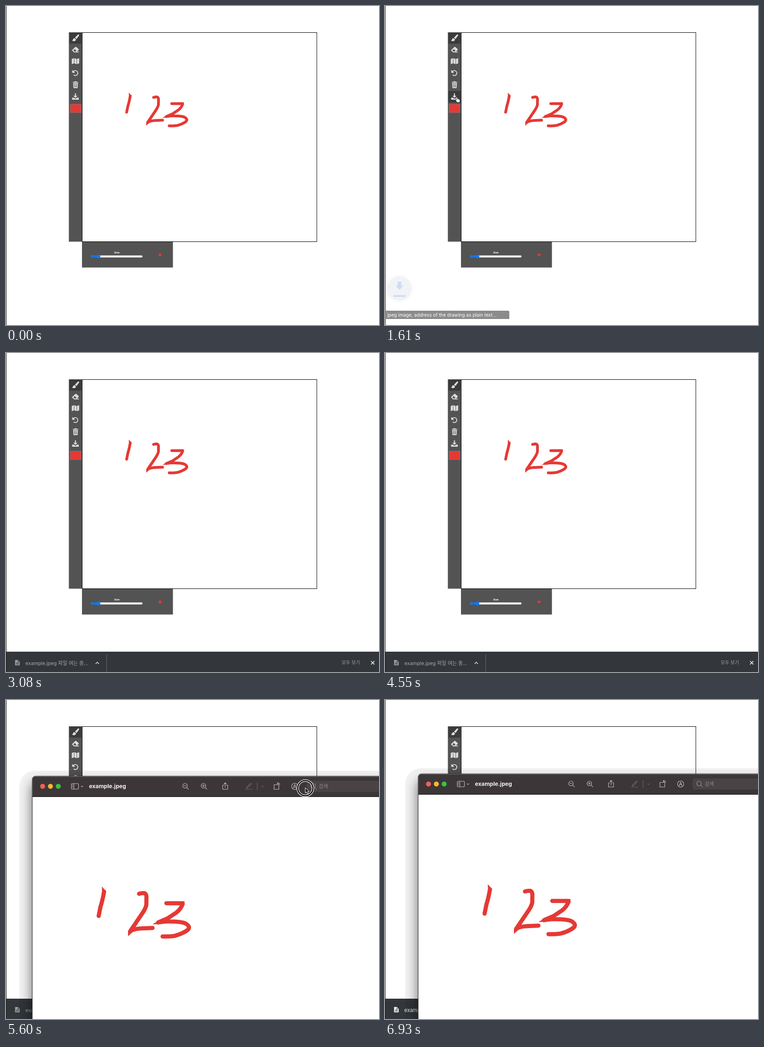
Recreate the animation shown at these times as an HTML page. Size 810 px wide and 691 px high, loop 7000 ms.

```html
<!DOCTYPE html>
<html lang="ko">
<head>
<meta charset="utf-8">
<title>Drawing board</title>
<style>
html, body { margin: 0; width: 100%; height: 100%; overflow: hidden; background: #fff; }
svg { display: block; width: 810px; height: 691px; }
text { font-family: Inter, "Noto Sans CJK KR", "Noto Sans CJK", sans-serif; white-space: pre; }
.line { fill: none; stroke: #ddd; stroke-width: 1.9; }
.tool { fill: none; stroke: #c4bfc0; stroke-width: 1.1; stroke-linecap: round; stroke-linejoin: round; }
.dim { stroke: #6b6465; }
</style>
</head>
<body>
<svg viewBox="0 0 810 691" width="810" height="691">
  <defs>
    <filter id="blur" x="-20%" y="-20%" width="140%" height="140%"><feGaussianBlur stdDeviation="12"/></filter>
    <g id="digits" fill="none" stroke="#e53935" stroke-width="6" stroke-linecap="round" stroke-linejoin="round">
      <path d="M269.8 195Q267.5 208 264.6 217L262 230"/>
      <path d="M266.6 187.5L273 194.5 270 199 267 197Z" fill="#e53935" stroke="none"/>
      <path d="M320.5 198Q324 196.8 328 197Q331 198 331.2 202L331 214Q330 219 326 225L308 251.5Q314 248.5 324 248L340 247.3"/>
      <path d="M304.5 251V259.3L315 250Z" fill="#e53935" stroke="none"/>
      <path d="M360 211.6H383.5V213Q381 220 374 225.5Q367 230 362 233.5L348 239.5Q354 237.8 364 238Q382 238 388 241Q396 246 390.5 250.5Q383 256 372 258.8Q364 260 354.5 259.6"/>
      <path d="M376 208.8H386.2V214L380 215ZM339.8 242.2L350 236 356 241.5Z" fill="#e53935" stroke="none"/>
    </g>
    <path id="doc" d="M0 0H6L10 4V11.5H0ZM5.4 1.2V4.7H8.9ZM2 7.2H8V6H2ZM2 9.6H8V8.4H2Z" fill-rule="evenodd"/>
    <g id="glass" class="tool"><circle cx="-1.2" cy="-1.2" r="5"/><path d="M2.6 2.6L6.4 6.4"/></g>
  </defs>

  <rect width="810" height="691" fill="#fff"/>
  <rect width="1" height="691" fill="#1c1416"/>

  <rect x="165.5" y="57.5" width="509.5" height="453" fill="#fff" stroke="#000"/>
  <rect x="136.5" y="57" width="28.5" height="453.5" fill="#535353"/>
  <rect x="137.5" y="57.5" width="26.5" height="24" fill="#3b3b3b"/>
  <rect id="hover" x="137.5" y="184" width="26.5" height="25" fill="#3b3b3b"/>
  <g fill="#ddd">
    <path d="M156.6 61.6Q159.4 61.2 158.5 64.2L153.2 71.6 149.6 68.8Z"/>
    <path d="M148.8 69.8L152 72.3C152 75 149.8 76.4 147.2 76.3Q144.4 76.2 143.2 74.6C145 74.6 145.2 73.3 145.7 71.8Q146.6 69.5 148.8 69.8Z"/>
    <path fill-rule="evenodd" d="M143.9 95L150.6 88.7Q151.6 87.9 152.6 88.7L157.6 93.3Q158.5 94.4 157.6 95.4L154 98.8H158.2V100.4H148L143.9 96.8Q143 95.9 143.9 95ZM146.4 95.9L148.7 98.5H151.4L153 97 149.3 93.3Z"/>
    <path d="M142.8 114.8L147.6 113V124.2L142.8 126ZM148.5 113L153.2 114.8V126L148.5 124.2ZM154.1 114.8L158.9 113V124.2L154.1 126Z"/>
    <path class="line" d="M146.4 141.8A5.4 5.4 0 1 1 147 149.3"/>
    <path d="M143.9 138.4V144.7H150.2Z"/>
    <path fill-rule="evenodd" d="M145 164.4H148.6L149.3 163H152.8L153.5 164.4H157V166H145ZM145.8 167H156.2L155.6 177Q155.5 178 154.5 178H147.5Q146.5 178 146.4 177ZM148 168.8V176.3H149V168.8ZM150.5 168.8V176.3H151.5V168.8ZM153 168.8V176.3H154V168.8Z"/>
    <path d="M149.7 189H151.9V194.5H155.4L150.8 199 146.2 194.5H149.7Z"/>
    <path d="M143.6 198.5H147.3L150.8 201 154.3 198.5H158V203H143.6Z"/>
  </g>
  <rect x="139.5" y="212.5" width="23.5" height="18.5" fill="#e53935" stroke="#777"/>
  <use href="#digits"/>

  <rect x="165" y="510.5" width="197.5" height="56" fill="#535353"/>
  <path d="M165 510.5H675" stroke="#000"/>
  <text x="235" y="535.8" font-size="6" font-weight="700" fill="#fff" style="font-family:'Noto Sans',sans-serif">Size</text>
  <rect x="185" y="540.2" width="111.5" height="4.6" rx="2.3" fill="#efefef"/>
  <rect x="185" y="540" width="18" height="5" rx="2.5" fill="#1473e6"/>
  <circle cx="200.8" cy="542.5" r="4" fill="#1477f0"/>
  <circle cx="334.5" cy="539" r="3.1" fill="#e53935"/>

  <g id="started">
    <circle cx="31.5" r="30" fill="#f8f8f8"/>
    <circle cx="31.5" r="26" fill="#e5e8ee"/>
    <path d="M27.8 -15H35.2V-6.5H40L31.5 3 23 -6.5H27.8ZM18 14.5H45V18H18Z" fill="#a1baeb"/>
  </g>
  <g id="status">
    <path d="M0 660H267Q270 660 270 663V678H0Z" fill="#8b8b8b"/>
    <text x="5" y="672.7" font-size="10.1" fill="#fff">jpeg image, address of the drawing as plain text...</text>
  </g>

  <g id="shelf">
    <rect x="1" y="647" width="809" height="44" fill="#33373b"/>
    <path d="M1 647.5H810" stroke="#292c2f"/>
    <circle id="progress" cx="24.7" cy="671" r="10.4" fill="#2f3c52" stroke="#8095c0" stroke-width="1.4"/>
    <use id="fileIcon" href="#doc" x="19.7" y="665"/>
    <text id="fileName" x="42" y="675.7"></text>
    <g id="shelfEnd" fill="none">
      <path d="M177.5 673.5L181.2 669.8 184.9 673.5" stroke="#e8e8e8" stroke-width="1.4"/>
      <path d="M201.5 653V690" stroke="#666a6e"/>
    </g>
    <rect id="showBox" x="716.5" y="657.5" width="64" height="27" rx="3" fill="#30353b" stroke="#3a3f45"/>
    <text id="showAll" x="729" y="674.2" font-size="10">모두 보기</text>
    <path d="M792.7 667.2L800.1 674.6M800.1 667.2L792.7 674.6" stroke="#f1f1f1" stroke-width="1.5"/>
  </g>

  <g id="win">
    <rect x="-28" y="-12" width="820" height="620" rx="34" fill="#000" opacity=".055"/>
    <rect x="-2" y="14" width="768" height="600" rx="12" fill="#000" opacity=".5" filter="url(#blur)"/>
    <path d="M0 600V8Q0 0 8 0H756Q764 0 764 8V600Z" fill="#fff" stroke="#1a1718"/>
    <path d="M.5 44V8Q.5 .5 8 .5H756Q763.5 .5 763.5 8V44Z" fill="#3d3638"/>
    <path d="M6 1H758" stroke="#655e60"/>
    <path d="M0 44.5H764" stroke="#0c0a0b"/>
    <circle cx="22.5" cy="22" r="5.4" fill="#f0605a"/>
    <circle cx="39.5" cy="22" r="5.4" fill="#f5b731"/>
    <circle cx="56.5" cy="22" r="5.4" fill="#38c440"/>
    <g class="tool">
      <rect x="85" y="16" width="15.5" height="12" rx="2"/>
      <path d="M90.5 16V28M87 19H88.5M87 21.5H88.5M87 24H88.5M106.2 21.3L108 23.2 109.8 21.3"/>
      <path d="M329.3 20.8H334.3M369.3 20.8H374.3M371.8 18.3V23.3"/>
      <path d="M416 19.5H413.5V28.5H424.5V19.5H422M419 24.5V14.5M416.3 17L419 14.2 421.7 17"/>
      <path class="dim" d="M465 25L474 15.5Q476 14.5 476 17L467 25.8 464.5 26.5ZM463 28.5H477M488.5 14V30M498.2 21.5L500 23.3 501.8 21.5"/>
      <path d="M525 18.5H535.5V28.5H525ZM532.5 15.5H535.5Q537.5 15.5 537.5 18M534 13.6L532 15.5 534 17.4"/>
      <circle cx="570" cy="22" r="6.7"/>
      <path d="M567 25.5L570 18 573 25.5M568.3 23.5H571.7"/>
    </g>
    <use href="#glass" x="333" y="22"/>
    <use href="#glass" x="373" y="22"/>
    <text x="123.3" y="26.2" font-size="12.2" font-weight="700" fill="#f1eff0">example.jpeg</text>
    <rect x="596" y="10" width="157" height="24" rx="5" fill="#4a4345"/>
    <use href="#glass" x="611" y="22" opacity=".65"/>
    <text x="622" y="26.2" font-size="11" fill="#918a8c">검색</text>
    <use href="#digits" transform="translate(-248.75 -42.25) scale(1.5)"/>
  </g>

  <g id="cursor">
    <g id="press" fill="none">
      <circle cy="1" r="16.5" stroke="#fff" stroke-width="5"/>
      <circle cy="1" r="16.5" stroke="#0b0b0b" stroke-width="2.6"/>
    </g>
    <path id="arrow" d="M0 0V11.5L2.6 9.2 4.4 13.5 6.6 12.5 4.8 8.4H8.3Z" fill="#111" stroke="#fff"/>
    <path id="hand" d="M-1.6 1Q-.6-1 .8.6L2.2 4.4 3.2 4Q4 3.6 4.4 4.6 5.4 4 6 5.1 7.2 4.8 7.5 6L8 9 7 12H2L-2 8Q-2.8 6.6-1 6.6L.2 7.2Z" fill="#fff" stroke="#111" stroke-width=".9"/>
  </g>
</svg>
<script>
const LOOP = 7000, STEP = 70;
const el = id => document.getElementById(id);
const show = (id, on) => el(id).setAttribute("display", on ? "inline" : "none");
const move = (id, x, y) => el(id).setAttribute("transform", `translate(${x} ${y})`);
const fill = (id, color) => el(id).setAttribute("fill", color);
const within = (t, a, b) => t >= a && t < b;

// each key is [time, x, y]
const pointer = [
  [70, 330, 250], [770, 168, 170], [840, 168, 170], [980, 155, 197], [1890, 155, 197],
  [2100, 128, 380], [2310, 88, 640], [2380, 82, 666], [3080, 82, 666],
  [5110, 612, 355], [5180, 614, 310], [5250, 618, 261], [5320, 624, 245], [5460, 639, 210],
  [5600, 650, 190], [5670, 659, 179], [5740, 664, 185], [6230, 665, 185], [6370, 531, 604]
];
const windowPath = [
  [5110, 17, 335], [5180, 20, 300], [5250, 24, 260], [5320, 29, 236], [5460, 45, 186],
  [5600, 57, 165], [5670, 66, 154], [5740, 70, 160], [5880, 71, 160], [6090, 72, 160]
];

function at(keys, t) {
  let i = keys.findIndex(k => k[0] > t);
  if (i < 0) i = keys.length;
  if (i === 0 || i === keys.length) return keys[Math.max(0, i - 1)].slice(1);
  const a = keys[i - 1], b = keys[i], p = (t - a[0]) / (b[0] - a[0]);
  return [a[1] + (b[1] - a[1]) * p, a[2] + (b[2] - a[2]) * p];
}

function drawShelf(t) {
  show("shelf", t >= 1750);
  const p = Math.min(1, Math.max(0, (t - 1680) / 280));
  move("shelf", 0, 44 * (1 - p) ** 2);
  const opening = within(t, 2590, 5950), fresh = t < 2590;
  show("progress", fresh);
  show("showBox", fresh);
  fill("showAll", fresh ? "#8ab4f8" : "#a0a3a6");
  fill("fileIcon", opening ? "#9a9da0" : "#f4f4f4");
  fill("fileName", opening ? "#a4a7aa" : "#f4f4f4");
  const name = el("fileName");
  name.textContent = opening ? "example.jpeg 파일 여는 중..." : "example.jpeg";
  name.setAttribute("font-size", opening ? 10.8 : 11);
  move("shelfEnd", opening ? 17 : 0, 0);
}

function drawStarted(t) {
  const s = (t - 1100) / 600;
  show("started", within(s, 0, 1));
  move("started", 0, 663 - 60 * s);
  el("started").setAttribute("opacity", Math.max(0, 1 - 4 * (s - 0.5) ** 2));
}

function draw(t) {
  const [x, y] = at(pointer, t);
  const onButton = within(t, 910, 1960) && x < 165 && y < 209;
  show("hover", onButton);
  show("status", within(t, 980, 1750));
  drawStarted(t);
  drawShelf(t);
  show("win", t >= 5110);
  move("win", ...at(windowPath, t));
  show("cursor", within(t, 70, 3080) || within(t, 5110, 6440));
  move("cursor", x, y);
  show("press", within(t, 5110, 5950));
  show("hand", onButton);
  show("arrow", !onButton);
}

const start = performance.now();
function tick() {
  const t = (performance.now() - start) % LOOP;
  draw(Math.floor(t / STEP) * STEP);
  requestAnimationFrame(tick);
}
tick();
</script>
</body>
</html>
```
